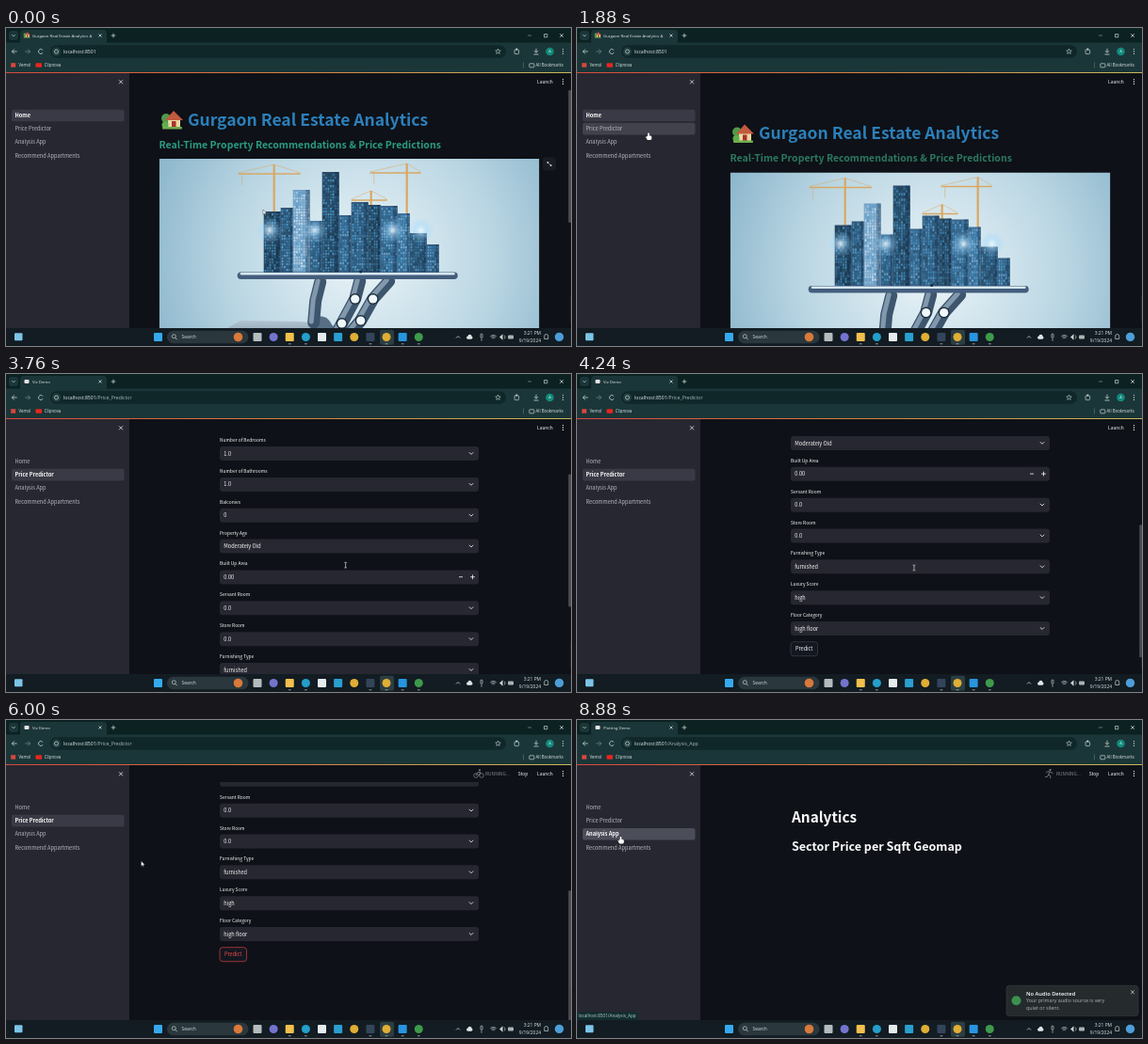
Write an HTML page with a canvas that moves like this. It is 600 by 338 pixels and loops after 9 s.

```html
<!DOCTYPE html>
<html lang="en">
<head>
<meta charset="utf-8">
<title>Property app demo</title>
<style>
html, body { margin: 0; width: 600px; height: 338px; overflow: hidden; background: #0e1117; }
canvas { display: block; }
</style>
</head>
<body>
<canvas id="stage" width="600" height="338"></canvas>
<script>
const g = document.getElementById('stage').getContext('2d');
const PAGE = '"Noto Sans CJK JP", "Noto Sans CJK SC", "Noto Sans CJK", Lato, sans-serif';
const UI = '"Open Sans", "Noto Sans", sans-serif';
const INK = '#c9d6d6', WHITE = '#fafafa', GREY = '#85868c';
const LOOP = 9000, STEP = 125;
const FORM_AT = 2520, CHARTS_AT = 8150, ALL_FIELDS_AT = 3100;

const menu = ['Home', 'Price Predictor', 'Analysis App', 'Recommend Appartments'];
const fields = [['Property Type', 'flat'], ['Sector', 'dwarka expressway'], ['Number of Bedrooms', '1.0'],
  ['Number of Bathrooms', '1.0'], ['Balconies', '0'], ['Property Age', 'Moderately Old'], ['Built Up Area', '0.00'],
  ['Servant Room', '0.0'], ['Store Room', '0.0'], ['Furnishing Type', 'furnished'], ['Luxury Score', 'high'],
  ['Floor Category', 'high floor']];
const welcome = [
  'Welcome to the Gurgaon Real Estate Analytics App! This tool helps you discover the best real estate properties based on',
  'features and predicts prices using advanced machine learning models. It offers real-time property recommendations,',
  'price predictions, and much more, all within an intuitive and interactive interface.'];

// Pointer moves: start, end, x, y
const moves = [[1360, 1870, 75.5, 111.5], [2040, 2360, 45, 107], [2520, 2750, 62, 133], [2750, 3000, 369, 194],
  [3000, 4100, 358, 206], [4390, 4900, 241, 250], [5520, 6000, 143.5, 150], [6390, 7270, 46, 124]];

const between = (t, a, b) => t >= a && t < b;
function ease(t, a, b) {
  const p = Math.min(1, Math.max(0, (t - a) / (b - a)));
  return p * p * (3 - 2 * p);
}
function pointer(t) {
  let x = 273, y = 193;
  for (const [a, b, toX, toY] of moves) {
    const p = ease(t, a, b);
    x += (toX - x) * p;
    y += (toY - y) * p;
  }
  return [x, y];
}
const homeScroll = t => 14.5 + 130 * ease(t, 240, 800) - 144.5 * ease(t, 1000, 1520);
const formScroll = t => 224 * ease(t, 3390, 4100) + 43 * ease(t, 4390, 4760);

function random(seed) {
  return () => (seed = seed * 16807 % 2147483647) / 2147483647;
}

// y is the middle of the capitals
function text(s, x, y, size, color, font = PAGE, weight = 400, align = 'left') {
  g.font = `${weight} ${size}px ${font}`;
  g.textAlign = align;
  g.fillStyle = color;
  g.fillText(s, x, y + size * 0.36);
}
function rect(x, y, w, h, color, r = 0, border) {
  g.beginPath();
  g.roundRect(x, y, w, h, r);
  if (color) { g.fillStyle = color; g.fill(); }
  if (border) { g.strokeStyle = border; g.lineWidth = 0.7; g.stroke(); }
}
function dot(x, y, r, color) {
  rect(x - r, y - r, 2 * r, 2 * r, color, r);
}
function arc(x, y, r, color = INK, w = 0.7, from = 0, to = 7) {
  g.beginPath();
  g.arc(x, y, r, from, to);
  g.strokeStyle = color;
  g.lineWidth = w;
  g.stroke();
}
function trace(pts) {
  g.beginPath();
  for (let i = 0; i < pts.length; i += 2) g.lineTo(pts[i], pts[i + 1]);
}
function line(pts, color = INK, w = 0.8) {
  trace(pts);
  g.strokeStyle = color;
  g.lineWidth = w;
  g.stroke();
}
function poly(pts, color) {
  trace(pts);
  g.fillStyle = color;
  g.fill();
}
function at(x, y, paint, k = 1) {
  g.save();
  g.translate(x, y);
  g.scale(k, k);
  paint();
  g.restore();
}
function fade(shape, ...colors) {
  colors.forEach((c, i) => shape.addColorStop(i / (colors.length - 1), c));
  return shape;
}
function cross(x, y, r, color = INK) {
  line([x - r, y - r, x + r, y + r], color);
  line([x - r, y + r, x + r, y - r], color);
}
function plus(x, y, r, color = INK) {
  line([x - r, y, x + r, y], color);
  line([x, y - r, x, y + r], color);
}
const chevron = (x, y, r, color = INK, d = r / 2) => line([x - r, y - d, x, y + d, x + r, y - d], color);
const dots = (x, y, color) => [-2.4, 0, 2.4].forEach(d => dot(x, y + d, 0.65, color));

function house() {
  dot(5, 8, 5, '#4f9a4a');
  rect(7, 8, 13, 10, '#ead8a0');
  poly([4, 10, 13, 0, 23, 10], '#c25a3f');
  rect(11, 11, 4.5, 7, '#a8322c');
  dot(4, 15, 3.5, '#5fae4d');
  rect(1, 17, 21, 2.5, '#6fae4e', 1);
}

function crane(x, top, left, right) {
  const c = '#d9a762', jib = top + 10;
  line([x, top, x, 60], c, 2.2);
  line([left, jib, right, jib], c, 1.7);
  line([left, jib - 1, x, top, right, jib - 1], c, 0.5);
  line([left + 4, jib, left + 4, jib + 12], c, 0.5);
}

function skyline() {
  const next = random(77);
  let x = 111;
  [56, 52, 33, 66, 14, 60, 46, 49, 50, 58, 79, 91].forEach((top, i) => {
    const w = i % 2 ? 13 : 18, light = i === 2 ? 62 : 27 + next() * 17;
    rect(x, top, w, 121 - top, `hsl(208 42% ${light}%)`);
    for (let cx = x + 1; cx < x + w - 1; cx += 2.5) {
      for (let cy = top + 2; cy < 119; cy += 3) {
        rect(cx, cy, 1.6, 2.2, `hsl(203 50% ${light + next() * 34 - 8}%)`);
      }
    }
    rect(x + w * 0.75, top, w * 0.25, 121 - top, '#10284260');
    x += w;
  });
  for (const gx of [117, 165, 248, 278]) {
    rect(gx - 14, 62, 28, 28, fade(g.createRadialGradient(gx, 76, 0, gx, 76, 14), '#f2fbffe0', '#9fd8ff60', '#9fd8ff00'));
  }
}

function finger(...pts) {
  line(pts, '#3d566e', 13);
  line(pts.map((v, i) => v - (i % 2 ? 1 : 2.5)), '#8299ad', 5);
}

function robotArm() {
  g.lineCap = g.lineJoin = 'round';
  line([-5, 218, 38, 201], '#6d8293', 25);
  line([-5, 207, 36, 192], '#b9cad4', 4);
  poly([55, 190, 86, 172, 150, 173, 192, 178, 203, 190, 198, 211, 150, 223, 60, 226],
    fade(g.createLinearGradient(0, 171, 0, 226), '#b4c7d3', '#71899d', '#2f455b'));
  line([60, 187, 165, 186, 195, 192], '#253444', 2);
  poly([94, 195, 123, 192, 116, 204, 88, 204], '#172330');
  dot(46, 194, 12, '#3e4a55');
  arc(46, 194, 5, '#a3b0ba', 2);
  line([172, 178, 185, 198], '#586f85', 21);
  finger(164, 174, 166, 151, 171, 131);
  finger(191, 199, 214, 172, 227, 149, 244, 130);
  finger(184, 194, 194, 175, 208, 149, 213, 130);
  for (const [x, y] of [[208, 149], [227, 149], [194, 175], [214, 172]]) {
    dot(x, y, 6, '#1f2d3b');
    dot(x, y, 4.6, '#eef7fb');
  }
  g.lineCap = 'butt';
  g.lineJoin = 'miter';
}

function photo() {
  g.beginPath();
  g.rect(0, 0, 403.5, 227);
  g.clip();
  rect(0, 0, 404, 227, fade(g.createRadialGradient(215, 105, 20, 215, 105, 260), '#e4f0f5', '#bad6e3', '#82afc7'));
  crane(122, 6, 84, 150);
  crane(263, 5, 224, 278);
  crane(225, 34, 204, 242);
  skyline();
  robotArm();
  rect(83, 120.5, 234, 7.5, '#435d7c', 3.7);
  rect(86, 121, 228, 2.6, '#d5e7f3', 1.3);
  dot(214, 120, 1.6, '#172b40');
}

function home(t) {
  at(165, 102.5, house);
  text('Gurgaon Real Estate Analytics', 193, 111.7, 17.5, '#2c80bb', PAGE, 700);
  text('Real-Time Property Recommendations & Price Predictions', 162.5, 138.7, 10.5, t < 875 ? '#2a9c83' : '#2b795f', PAGE, 700);
  at(162.7, 153.5, photo);
  if (t < 1400) {
    rect(570, 152, 14, 14, '#1a1c24', 3);
    line([575, 157, 579, 161], '#c8c8c8', 0.6);
    dot(575.4, 157.4, 1, '#c8c8c8');
    dot(578.6, 160.6, 1, '#c8c8c8');
  }
  text('AI is Revolutionizing Real Estate Industry', 364.5, 388.5, 4.98, '#a3a4aa', PAGE, 400, 'center');
  rect(163.7, 401.7, 404, 59, '#6d6063', 4);
  rect(162.5, 400.5, 404, 59, '#f8d7da', 4);
  welcome.forEach((row, i) => text(row, 166.7, 417.7 + i * 12.7, 7.01, '#333338'));
}

function form(t) {
  const shown = t < ALL_FIELDS_AT ? Math.floor((t - FORM_AT) / 120) : fields.length;
  if (shown > 0) text('Enter your inputs', 228, 100, 12.55, WHITE, PAGE, 700);
  fields.slice(0, shown).forEach(([label, value], i) => {
    const y = 119 + 32.85 * i;
    text(label, 228, y, 4.88, WHITE);
    rect(228, y + 6.7, 275, 15, '#262730', 3);
    text(value, 232.3, y + 14.3, 5.56, WHITE);
    if (label === 'Built Up Area') {
      line([482, y + 14, 486, y + 14], WHITE);
      plus(496.5, y + 14, 2.4, WHITE);
    } else chevron(495, y + 14, 2.2, WHITE);
  });
  if (shown < fields.length) return;
  const hot = t >= 4900;
  rect(228, 508.7, 28.5, 15, '#131720', 3, hot ? '#d8433f' : '#41434b');
  text('Predict', 242.2, 516.3, 5.56, hot ? '#f04a48' : WHITE, PAGE, 400, 'center');
}

function analytics() {
  text('Analytics', 228, 103.5, 15.35, WHITE, PAGE, 700);
  text('Sector Price per Sqft Geomap', 228, 134.5, 12.55, WHITE, PAGE, 700);
}

function sidebar(page, x, y) {
  rect(0, 48, 131, 271, '#262730');
  cross(122, 57.3, 2, '#e8e8ea');
  const over = between(x, 6, 125) ? Math.round((y - 93) / 14) : -1;
  menu.forEach((name, i) => {
    const on = i === page, cy = 93 + 14.1 * i;
    if (on || i === over) rect(6, cy - 6.3, 119.5, 12.6, on && i === over ? '#4b4d58' : on ? '#393a45' : '#41424c', 2);
    text(name, 9.5, cy + 0.2, 5.65, on ? '#ffffff' : '#b9bac0', PAGE, on ? 700 : 400);
  });
}

function runner() {
  dot(0.5, -4, 1.1, GREY);
  line([-4, -1, -2, -2.3, 0, -2, 3.5, -0.5], GREY);
  line([0, -2, -1.3, 1, 1, 2.5, 0.5, 5], GREY);
  line([-1.3, 1, -2.5, 3.3, -5, 3.5], GREY);
}
function cyclist() {
  dot(1, -3.7, 1, GREY);
  arc(-3, 2, 2.3, GREY);
  arc(3, 2, 2.3, GREY);
  line([-3, 2, -1, -1.5, 2, -1.5, 0, 2], GREY);
}

function header(t) {
  text('Launch', 564, 57, 4.88, WHITE);
  dots(591.5, 57, WHITE);
  const predicting = between(t, 5500, 6300);
  if (!predicting && !between(t, FORM_AT, 3360) && t < CHARTS_AT) return;
  at(502, 57, predicting ? cyclist : runner);
  text('RUNNING...', 509, 57, 4.88, GREY);
  text('Stop', 543.7, 57, 4.88, WHITE);
}

function tabStrip(page) {
  rect(0, 0, 600, 16, '#0b2122');
  rect(0, 15.5, 600, 32, '#1b3638');
  rect(3, 3, 10, 10, '#1b3638', 3);
  chevron(8, 8, 1.6);
  rect(15, 2, 92, 16, '#1b3638', 4);
  if (page) rect(19.5, 6, 5, 4, '#e9e3e3', 1);
  else at(18.5, 4.2, house, 0.32);
  text(['Gurgaon Real Estate Analytics A', 'Viz Demo', 'Plotting Demo'][page], 28, 8, 4.3, '#e1e9e9', UI);
  cross(100, 8, 1.5);
  plus(114, 8, 2.3);
  line([554, 8, 558, 8], '#71898a');
  rect(571.5, 6.5, 3.3, 3.3, null, 0, INK);
  cross(590, 8, 1.8);
}

function toolbar(page) {
  for (const [x, d, c] of [[9, -1, INK], [23, 1, '#6f8586']]) {
    line([x - 2.7, 25, x + 2.7, 25], c);
    line([x + d * 0.2, 22.5, x + d * 2.7, 25, x + d * 0.2, 27.5], c);
  }
  arc(37, 25, 2.5, INK, 0.8, 0.5, 5.6);
  rect(47, 18.3, 484, 13.4, '#0f2729', 6.7);
  dot(53.5, 25, 4.5, '#233f41');
  arc(53.5, 25, 2);
  text('localhost:8501', 61, 25, 5.15, '#e3eaea', UI);
  text(['', '/Price_Predictor', '/Analysis_App'][page], 61 + g.measureText('localhost:8501').width, 25, 5.15, '#a9b9b9', UI);
  const star = [];
  for (let i = 0; i <= 10; i++) {
    const a = i * Math.PI / 5, r = i % 2 ? 1.3 : 2.9;
    star.push(522.5 + r * Math.sin(a), 25 - r * Math.cos(a));
  }
  line(star, INK, 0.6);
  rect(540, 23, 4.6, 4.6, null, 1, INK);
  dot(542.3, 22.6, 1, INK);
  line([563, 21.8, 563, 26]);
  chevron(563, 25.2, 2);
  line([560.5, 28, 565.5, 28]);
  dot(577.5, 25, 4.3, '#128b7d');
  text('A', 577.5, 25, 4, '#d8efeb', UI, 400, 'center');
  dots(591.5, 25, INK);
}

function bookmarks() {
  rect(5.2, 37.2, 5, 4.5, '#d9463d');
  text('Vemol', 13.5, 39.7, 4.4, '#dce5e5', UI);
  rect(31.5, 37.2, 6.5, 4.6, '#e8261f', 1);
  text('Clipnova', 40.7, 39.7, 4.4, '#dce5e5', UI);
  line([549.5, 36.5, 549.5, 42.5], '#48696b');
  rect(555.8, 37.8, 5, 4, null, 0.6, INK);
  text('All Bookmarks', 562.5, 39.7, 4.4, '#dce5e5', UI);
  rect(0, 47, 600, 1, fade(g.createLinearGradient(0, 0, 600, 0), '#d9483f', '#d9813f', '#c9b95c'));
}

function taskbar() {
  rect(0, 319, 600, 19, '#121c22');
  rect(9, 324.3, 8.5, 8, '#7cc4e8', 1);
  rect(157, 324, 9, 9, '#35a9ee', 1);
  rect(171, 321.7, 86.5, 13.6, '#2a373c', 6.8);
  arc(178.3, 327.7, 2);
  line([179.7, 329.2, 181.7, 331.2]);
  text('Search', 186.5, 328.5, 4.9, '#d5dddd', UI);
  dot(246.5, 328.5, 4.8, '#d9793a');
  rect(397, 320.7, 15, 16, '#2c3e41', 2);
  const apps = ['#b5bcbe', '#7474cf', '#f2c04c', '#249fca', '#e6ebed', '#299fd0', '#dfae35', '#33455a', '#dfae35', '#2795df', '#3e9a4b'];
  apps.forEach((color, i) => {
    const x = 267 + 17.13 * i;
    rect(x - 4.5, 324, 9, 9, color, '01010010101'[i] === '1' ? 4.5 : 1);
    if (i === 2 || i === 3 || i > 6) rect(x - 1.5, 335.2, 3, 1, '#8e9a9c', 0.5);
  });
  chevron(480, 328.5, 2, INK, -1);
  rect(489, 327.5, 6.5, 3.2, '#dfe6e6', 1.6);
  dot(492.5, 327.7, 2, '#dfe6e6');
  rect(504, 325, 2, 4.5, null, 1, INK);
  line([505, 330.5, 505, 332.5]);
  for (const r of [1.5, 3, 4.5]) arc(517.5, 331, r, INK, 0.7, -2.35, -0.79);
  poly([524, 328.5, 527.5, 325.3, 527.5, 331.7], INK);
  arc(527.5, 328.5, 2.5, INK, 0.7, -0.9, 0.9);
  rect(533, 326.5, 6, 4, '#a9b5b5', 1);
  text('3:21 PM', 568, 324.5, 4.9, '#dfe6e6', UI, 400, 'right');
  text('9/19/2024', 568, 331.8, 4.9, '#dfe6e6', UI, 400, 'right');
  rect(571.7, 325.5, 4, 5, null, [2, 2, 0, 0], INK);
  dot(587.5, 328.4, 4.7, '#4d9ed8');
}

function status(t) {
  const path = t >= 7270 ? menu[2] : between(t, 2000, 2640) ? menu[1] : between(t, 2640, 3200) ? menu[3] : '';
  if (!path) return;
  const url = 'localhost:8501/' + path.replace(' ', '_');
  g.font = `400 4.65px ${UI}`;
  rect(0, 310.3, g.measureText(url).width + 3.5, 8.7, '#122d30', [0, 2, 0, 0]);
  text(url, 1.5, 314.8, 4.65, '#b7cccc', UI);
}

function toast(t) {
  at(144 * (1 - ease(t, 7400, 7760)), 0, () => {
    rect(456, 282.3, 140, 32.3, '#252b2d', 3, '#343c3e');
    dot(466.5, 298.3, 5, '#3c9150');
    text('No Audio Detected', 477, 290.7, 5.75, '#ffffff', UI, 600);
    text('Your primary audio source is very', 477, 298.5, 5.35, '#aeb4b5', UI);
    text('quiet or silent.', 477, 306.3, 5.35, '#aeb4b5', UI);
    cross(590, 289.3, 1.8, '#d5dadb');
  });
}

function hand() {
  rect(-0.3, 0, 1.6, 5, '#ffffff', 0.8);
  rect(-1.5, 3, 5.3, 4.5, '#ffffff', 1.4);
  line([-2.3, 4, -0.5, 7], '#ffffff', 1);
}
function beam() {
  for (const y of [-2.8, 2.8]) line([-1.4, y, 1.4, y], '#dddddd', 0.6);
  line([0, -2.8, 0, 2.8], '#dddddd', 0.7);
}
function arrow() {
  const tip = [0, 0, 0, 5.4, 1.3, 4.2, 2.2, 6, 3, 5.6, 2.2, 3.9, 3.9, 3.8, 0, 0];
  poly(tip, '#ffffff');
  line(tip, '#222222', 0.4);
}

function draw() {
  const t = Math.floor(performance.now() % LOOP / STEP) * STEP;
  const page = t < FORM_AT ? 0 : t < CHARTS_AT ? 1 : 2;
  const scroll = page ? formScroll(t) : homeScroll(t);
  const [x, y] = pointer(t);
  rect(0, 0, 600, 338, '#0e1117');
  g.save();
  g.beginPath();
  g.rect(131, 66, 469, 253);
  g.clip();
  const long = page === 0 || page === 1 && t > ALL_FIELDS_AT;
  at(page === 1 && long ? -1 : 0, page < 2 ? -scroll : 0, () => [home, form, analytics][page](t));
  if (x > 131 && long) rect(597.3, (page ? 50.5 : 59) + 0.49 * scroll, 2.7, 141, '#4b4d55', 1);
  g.restore();
  sidebar(page, x, y);
  header(t);
  tabStrip(page);
  toolbar(page);
  bookmarks();
  status(t);
  taskbar();
  toast(t);
  const onLink = x < 125 && between(y, 86, 142) || between(t, 4800, 5600);
  at(x, y, onLink ? hand : between(t, 2900, 4800) ? beam : arrow);
  requestAnimationFrame(draw);
}
draw();
</script>
</body>
</html>
```
